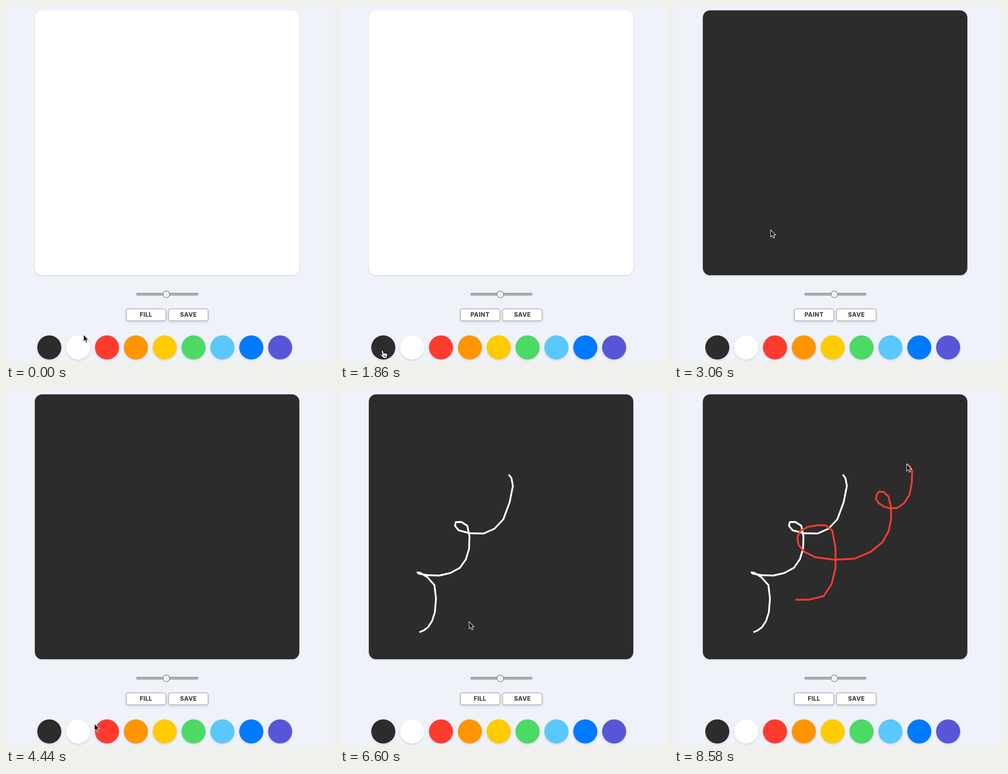
An HTML page that plays this animation: 719x779 px, repeating every 8640 ms.

```html
<!DOCTYPE html>
<html lang="en">
<head>
<meta charset="utf-8">
<title>Paint board</title>
<style>
  html, body { margin: 0; width: 100%; height: 100%; overflow: hidden; background: #eff2f8; }
  svg { display: block; width: 100%; height: 100%; }
  text { font: 800 13px Inter, sans-serif; letter-spacing: .4px; text-anchor: middle; fill: #444; }
  #board { filter: drop-shadow(0 1px 1px rgba(0, 0, 0, .2)); }
  #palette, .button { filter: drop-shadow(0 2px 2px rgba(50, 50, 93, .16)); }
  .button rect { fill: #fff; stroke: #bfbfc1; stroke-width: 2; }
  .stroke { fill: none; stroke-width: 3.9; stroke-linejoin: round; }
  #cursor { filter: drop-shadow(0 1px 1px rgba(0, 0, 0, .25)); }
  #arrow { fill: #000; stroke: #fff; stroke-width: 1.1; }
  #hand { fill: #fff; stroke: #000; stroke-width: 1.2; stroke-linejoin: round; }
</style>
</head>
<body>
<svg viewBox="0 0 719 779">
  <rect id="board" x="63.2" y="9.6" width="579.8" height="579.5" rx="16"/>
  <g id="strokes"></g>

  <rect x="286" y="628.5" width="135.5" height="4.5" rx="2" fill="#b5b5b5" stroke="#8b8b8b"/>
  <path d="M287 628.7H421" stroke="#747474"/>
  <circle cx="351.5" cy="631" r="7.3" fill="#f2f2f3" stroke="#747474" stroke-width="1.2"/>

  <g class="button"><rect x="263.8" y="662.8" width="86.6" height="26" rx="4.5"/><text id="mode" x="307" y="680">FILL</text></g>
  <g class="button"><rect x="356.4" y="662.8" width="86.6" height="26" rx="4.5"/><text x="400" y="680">SAVE</text></g>
  <g id="palette"></g>

  <g id="cursor">
    <path id="arrow" d="M0 0V15.5L3.6 12.2L6 17.8L8.6 16.7L6.3 11.3H10.9Z"/>
    <g id="hand">
      <path d="M-2 2C-2-.4 1-.6 1.6 1.5L3 7C3.5 5.6 5.5 5.8 6 7C6.8 6 8.3 6.3 8.7 7.6C9.5 7 10.7 7.6 10.9 9C11.2 11 10.7 13 9.8 15V17.8H1.7C.2 15-2.4 13-4.4 10.6C-5.4 9-3.5 7.9-2.2 9.1L-.3 10.8Z"/>
      <path d="M3.2 11.5V15M5.4 11.5V15M7.6 11.5V15" stroke-width="1"/>
    </g>
  </g>
</svg>
<script>
const LOOP = 8640, FRAME = 60, FILL_AT = 3060;
const $ = id => document.getElementById(id);
const svgNode = (parent, tag) =>
  parent.appendChild(document.createElementNS('http://www.w3.org/2000/svg', tag));

const colors = ['#2c2c2c', '#fff', '#ff3b30', '#ff9500', '#ffcc00', '#4cd964', '#5ac8fa', '#007aff', '#5856d6'];
const swatchX = i => 94.9 + 63.25 * i;
const SWATCH_Y = 747.2, SWATCH_R = 26.4;
$('palette').innerHTML = colors.map((c, i) =>
  `<circle cx="${swatchX(i)}" cy="${SWATCH_Y}" r="${SWATCH_R}" fill="${c}"/>`).join('');

// A smooth curve through a few key points, sampled coarsely like mouse input:
// every key plus one Catmull-Rom midpoint between neighbours.
function sampleCurve(keys) {
  const at = i => keys[Math.min(Math.max(i, 0), keys.length - 1)];
  const midpoint = i => [0, 1].map(axis =>
    (9 * (at(i)[axis] + at(i + 1)[axis]) - at(i - 1)[axis] - at(i + 2)[axis]) / 16);
  return keys.flatMap((key, i) => i < keys.length - 1 ? [key, midpoint(i)] : [key]);
}

function makeStroke(color, start, end, keyText) {
  const el = svgNode($('strokes'), 'polyline');
  el.setAttribute('class', 'stroke');
  el.setAttribute('stroke', color);
  return { el, start, end, points: sampleCurve(keyText.split(' ').map(p => p.split(',').map(Number))) };
}

const strokes = [
  makeStroke(colors[1], 5637, 6447,
    '174,530 193,519 208,486 207,427 176,400 173,402 218,406 263,389 ' +
    '283,347 279,297 254,289 260,307 315,314 358,283 379,210 370,185'),
  makeStroke(colors[2], 7635, 8575,
    '266,459 328,451 354,390 347,308 315,296 277,308 273,339 310,366 396,369 457,333 ' +
    '476,282 470,233 450,222 443,239 460,255 490,258 516,230 522,177 510,162')
];

// Pointer moves with the pen up; between them the pointer rests.
const move = (start, end, x, y) => ({ start, end, x, y });
const origin = { x: 170, y: 719 };
const moves = [
  move(0, 480, 366, 651),
  move(600, 960, 344, 678),     // FILL button
  move(1140, 1200, 286, 677),
  move(1200, 1860, 93, 753),    // black
  move(2460, 2940, 212, 490),
  move(3300, 4080, 290, 677),   // PAINT button
  move(4200, 4440, 194, 730),
  move(4440, 4740, 174, 752),   // white
  move(4980, 5580, 174, 530),
  move(6447, 6600, 283, 507),
  move(6600, 6780, 200, 745),
  move(6780, 7080, 227, 757),   // red
  move(7260, 7600, 266, 459)
];

const clamp = v => Math.min(1, Math.max(0, v));
const ease = k => k * k * (3 - 2 * k);

function pointerAt(t) {
  const position = { ...origin };
  for (const { start, end, x, y } of moves) {
    const k = ease(clamp((t - start) / (end - start)));
    position.x += (x - position.x) * k;
    position.y += (y - position.y) * k;
  }
  return [position.x, position.y];
}

function isClickable(x, y) {
  const onButton = y > 662 && y < 690 && (x > 263 && x < 351 || x > 356 && x < 443);
  return onButton || colors.some((_, i) => Math.hypot(x - swatchX(i), y - SWATCH_Y) < SWATCH_R);
}

function render(t) {
  let pointer = pointerAt(t);
  for (const { el, start, end, points } of strokes) {
    const progress = clamp((t - start) / (end - start));
    const drawn = t < start ? [] : points.slice(0, 1 + Math.floor(progress * (points.length - 1)));
    el.setAttribute('points', drawn.join(' '));
    if (t >= start && t < end + FRAME) pointer = drawn.at(-1);
  }
  const [x, y] = pointer, clickable = isClickable(x, y);
  $('cursor').setAttribute('transform', `translate(${x} ${y})`);
  $('hand').style.display = clickable ? '' : 'none';
  $('arrow').style.display = clickable ? 'none' : '';
  $('board').setAttribute('fill', t < FILL_AT ? '#fff' : colors[0]);
  $('mode').textContent = t >= 960 && t < 4260 ? 'PAINT' : 'FILL';
}

const begin = performance.now();
function tick() {
  const t = (performance.now() - begin) % LOOP;
  render(Math.floor(t / FRAME) * FRAME);
  requestAnimationFrame(tick);
}
tick();
</script>
</body>
</html>
```
